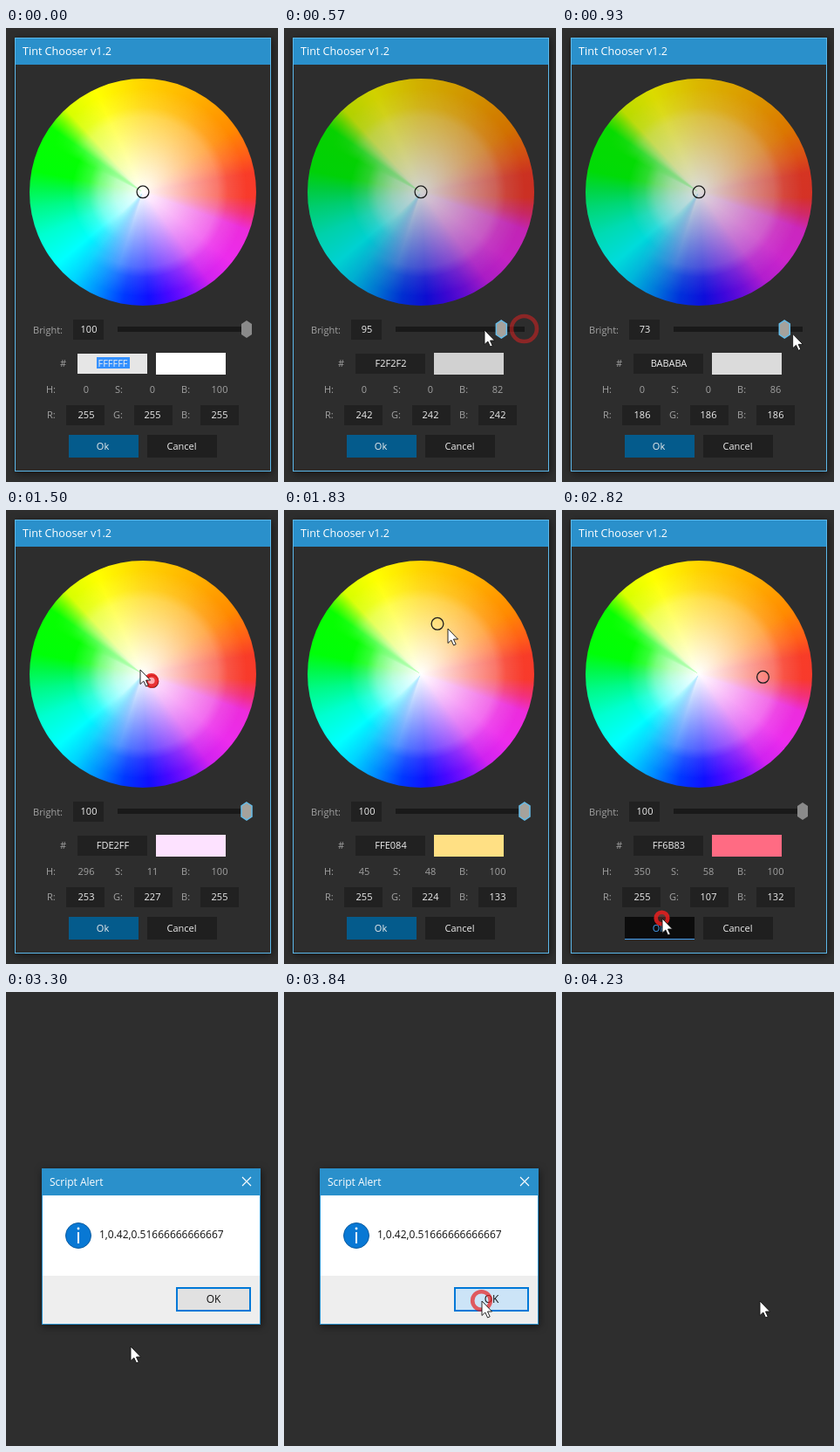
An HTML page for the animation above (4.26 s loop, 312 by 520 pixels).

```html
<!DOCTYPE html>
<html lang="en">
<head>
<meta charset="utf-8">
<title>Colour dialog</title>
<style>
  html, body { margin: 0; width: 100%; height: 100%; overflow: hidden; background: #2e2e2e; }
  #dialog, svg { position: absolute; left: 0; top: 0; width: 312px; height: 520px; }
  #dialog { transform-origin: 157px 259px; }
  #wheel { position: absolute; left: 27px; top: 58px; width: 260px; height: 260px; border-radius: 50%; overflow: hidden; }
  #wheel > div { position: absolute; inset: 0; }
  /* The green and cyan sector loses its white sooner than the rest. */
  #warm {
    background: radial-gradient(closest-side, #fff, rgba(255,255,255,.52) 45%, rgba(255,255,255,.31) 66%, rgba(255,255,255,.13) 75%, rgba(255,255,255,0) 92%);
    -webkit-mask-image: conic-gradient(#000 198deg, transparent 226deg 296deg, #000 311deg);
    mask-image: conic-gradient(#000 198deg, transparent 226deg 296deg, #000 311deg);
  }
  #cool {
    background: radial-gradient(closest-side, #fff, rgba(255,255,255,.72) 25%, rgba(255,255,255,.46) 39%, rgba(255,255,255,.2) 48%, rgba(255,255,255,0) 63%);
    -webkit-mask-image: conic-gradient(transparent 198deg, #000 226deg 296deg, transparent 311deg);
    mask-image: conic-gradient(transparent 198deg, #000 226deg 296deg, transparent 311deg);
  }
  #shade { background: #000; }
  text { font: 11px "Open Sans", "Noto Sans", sans-serif; fill: #eee; }
  .label { fill: #a2a2a2; }
  .mid { text-anchor: middle; }
  .title { font-size: 12.6px; fill: #fff; }
  .field { fill: #212121; }
  .shadow { filter: drop-shadow(1px 2px 4px rgba(0, 0, 0, .55)); }
  #alert { transform-origin: 166px 291px; }
  #alert text { font-size: 12px; }
</style>
</head>
<body>
<div id="dialog">
  <svg viewBox="0 0 312 520">
    <rect class="shadow" x="10.5" y="11.5" width="293" height="496" fill="#2d2d2d" stroke="#5cb8ea"/>
    <rect x="11" y="12" width="292" height="30" fill="#2a90cb"/>
    <text class="title" x="19" y="31">Tint Chooser v1.2</text>

    <text class="label" x="31" y="350">Bright:</text>
    <rect class="field" x="77" y="334" width="35" height="23"/>
    <text class="mid" id="bright" x="95" y="349"></text>
    <rect x="128" y="342" width="148" height="6" fill="#191919"/>
    <path id="knob" d="M0-10 6-6V6L0 10-6 6V-6Z"/>

    <text class="label" x="62" y="388">#</text>
    <rect id="hexField" x="82" y="373" width="80" height="23"/>
    <rect id="selection" x="104" y="377" width="38" height="13" fill="#3390ff"/>
    <text class="mid" id="hex" x="122.5" y="388"></text>
    <rect id="swatch" x="172" y="372" width="80" height="25"/>

    <g id="hsb"></g>
    <g id="rgb"></g>

    <rect id="okBox" x="72" y="466" width="80" height="26"/>
    <rect id="okLine" x="72" y="491" width="80" height="1" fill="#46a0f0"/>
    <text class="mid" id="okText" x="111" y="483">Ok</text>
    <rect x="162" y="466" width="80" height="26" fill="#1f1f1f"/>
    <text class="mid" x="201.5" y="483">Cancel</text>
  </svg>
  <div id="wheel"><div id="warm"></div><div id="cool"></div><div id="shade"></div></div>
  <svg viewBox="0 0 312 520">
    <circle id="marker" r="6.9" fill="none" stroke="#1c1c1c" stroke-width="1.3"/>
  </svg>
</div>
<svg viewBox="0 0 312 520">
  <g id="alert">
    <rect class="shadow" x="41.5" y="202.5" width="250" height="178" fill="#fff" stroke="#2a90cb"/>
    <rect x="42" y="203" width="249" height="30" fill="#2a90cb"/>
    <text x="50" y="222" style="fill:#fff">Script Alert</text>
    <path d="M271 212l10 10m0-10l-10 10" stroke="#fff" stroke-width="1.1"/>
    <rect x="42" y="325" width="249" height="55" fill="#eee"/>
    <circle cx="83" cy="279" r="14.5" fill="#0878d4" stroke="#0a5ba0"/>
    <path d="M83 275v13" stroke="#fff" stroke-width="2"/>
    <circle cx="83" cy="271" r="1.4" fill="#fff"/>
    <text x="107" y="282" style="fill:#111">1,0.42,0.51666666666667</text>
    <rect id="alertOk" x="196" y="339" width="84" height="26" stroke="#0078d7" stroke-width="2"/>
    <text class="mid" x="238" y="356" style="fill:#111">OK</text>
  </g>
  <circle id="ring" stroke="#e82020" stroke-width="4.6" fill="#ff7068"/>
  <path id="cursor" d="M0 0V16.5L3.8 13 6.6 19 9.2 17.8 6.5 12H11.6Z" fill="#fff" stroke="#111" stroke-width=".9"/>
</svg>
<script>
const LOOP = 4260, STEP = 30;
const CENTER = { x: 156.5, y: 187.5 };
const $ = id => document.getElementById(id);
const set = (id, attrs) => { for (const k in attrs) $(id).setAttribute(k, attrs[k]); };
const clamp = (v, lo, hi) => Math.min(hi, Math.max(lo, v));

// Clockwise angle from the top, hue, rim colour
const RIM = [
  [0, 50, '#ffd400'], [30, 41, '#ffb000'], [55, 31, '#ff8a00'], [70, 18, '#ff5f18'],
  [80, 6, '#f83c28'], [92.73, -10, '#f83a2c'], [102, -25, '#f2307c'], [110, -40, '#ec2cdc'],
  [128.2, -64, '#ec2cec'], [143, -75, '#d022f0'], [155, -90, '#8010fa'], [166, -105, '#4808ff'],
  [177, -120, '#1010ff'], [190, -133, '#0038ff'], [205, -155, '#0090ff'], [218, -170, '#00d4ff'],
  [230, -180, '#00ffff'], [247, -195, '#00ffd0'], [262, -212, '#00fa88'], [272, -228, '#00f848'],
  [281, -240, '#00ff08'], [305, -245, '#08ff00'], [311, -265, '#68ff00'], [317, -287, '#d8ff00'],
  [335, -300, '#ffff00'], [360, -310, '#ffd400']
];

// Pointer path: time, x, y
const PATH = [
  [0, 330, 535], [60, 322, 520], [210, 295, 405], [330, 277, 350], [390, 276, 345], [480, 276, 345],
  [510, 268.6, 345], [540, 249, 346], [570, 230, 346], [660, 186, 348], [720, 172, 349], [780, 180, 349],
  [900, 255, 350], [990, 284, 351], [1170, 284, 351], [1290, 225, 268], [1410, 170, 199],
  [1470, 167.3, 196], [1500, 154, 183], [1590, 127, 152], [1680, 132, 133], [1770, 163, 124],
  [1890, 213, 148], [1980, 230, 191], [2070, 230, 191], [2220, 208, 232], [2430, 158, 360],
  [2610, 121, 457], [2730, 115, 468], [3030, 115, 468], [3180, 134, 430], [3300, 143, 406],
  [3420, 174, 388], [3600, 224, 357], [3690, 227, 354], [4260, 227, 354]
];
const SLIDE = [480, 990], PICK = [1470, 1980];
const CLICKS = [420, 1470, 2780, 3750];

function track(list, at) {
  const i = clamp(list.findIndex(p => p[0] > at), 1, list.length - 1);
  const a = list[i - 1], b = list[i], k = clamp((at - a[0]) / (b[0] - a[0]), 0, 1);
  return [1, 2].map(n => a[n] + (b[n] - a[n]) * k);
}

function brightness(t) {
  const x = track(PATH, clamp(t, ...SLIDE))[0];
  return Math.round(clamp((x - 128) / 148, 0, 1) * 100);
}

function pick(t) {
  if (t < PICK[0]) return { ...CENTER, h: 0, s: 0 };
  const [x, y] = track(PATH, clamp(t - STEP, ...PICK));
  const dx = x - CENTER.x, dy = y - CENTER.y;
  const angle = (Math.atan2(dx, -dy) * 180 / Math.PI + 360) % 360;
  const h = (Math.round(track(RIM, angle)[0]) + 360) % 360;
  return { x, y, h, s: Math.round(clamp(Math.hypot(dx, dy) / 126, 0, 1) * 100) };
}

function toRgb(h, s, v) {
  return [5, 3, 1].map(n => {
    const k = (n + h / 60) % 6;
    return 255 * v / 100 * (1 - s / 100 * clamp(Math.min(k, 4 - k), 0, 1));
  });
}

const toHex = rgb => rgb.map(c => Math.floor(c + 1e-6).toString(16).padStart(2, '0')).join('').toUpperCase();

function buildRows() {
  const labelX = { H: 46, S: 125, R: 47, G: 123, B: 201 };
  const row = (names, y, boxed) => [...names].map((name, i) =>
    `<text class="label" x="${labelX[name]}" y="${y}">${name}:</text>` +
    (boxed ? `<rect class="field" x="${[69, 147, 223][i]}" y="${y - 15}" width="44" height="23"/>` : '') +
    `<text class="mid value ${boxed ? '' : 'label'}" x="${[92, 168, 245][i]}" y="${y}"></text>`).join('');
  $('hsb').innerHTML = row('HSB', 418, false);
  $('rgb').innerHTML = row('RGB', 447, true);
}

function fillRow(id, values) {
  $(id).querySelectorAll('.value').forEach((el, i) => { el.textContent = Math.round(values[i]); });
}

function fade(id, amount) {
  const style = $(id).style;
  style.opacity = amount;
  style.transform = `scale(${.94 + .06 * amount})`;
  style.display = amount > 0 ? '' : 'none';
}

function drawRing(t) {
  const start = CLICKS.filter(c => c <= t).pop();
  const age = start === undefined ? 999 : t - start;
  const [x, y] = track(PATH, start || 0);
  set('ring', {
    cx: x - .5, cy: y - .5, r: 4 + age * .07,
    'fill-opacity': clamp(1.5 - age / 32, 0, .9), opacity: clamp(1 - age / 300, 0, 1)
  });
}

function render(t) {
  const [cx, cy] = track(PATH, t);
  const p = pick(t), v = brightness(t - STEP), lateV = brightness(t - 2 * STEP);
  const rgb = toRgb(p.h, p.s, lateV);
  const focused = t < 420, hover = t >= 330 && t < 2610, pressed = t >= 2760;

  fade('dialog', 1 - clamp((t - 2940) / 120, 0, 1));
  fade('alert', clamp((t - 3060) / 120, 0, 1) - clamp((t - 3900) / 150, 0, 1));

  $('shade').style.opacity = 1 - v / 100;
  set('marker', { cx: p.x + .5, cy: p.y + .3 });
  set('knob', {
    transform: `translate(${128 + 1.48 * v} 345)`,
    fill: hover ? '#a5a29c' : '#8a8a8a', stroke: hover ? '#66bce8' : 'none', 'stroke-width': 1.5
  });
  $('bright').textContent = lateV;
  $('hex').textContent = toHex(rgb);
  set('hexField', { fill: focused ? '#e6e6e6' : '#212121' });
  set('selection', { opacity: focused ? 1 : 0 });
  set('swatch', { fill: '#' + toHex(toRgb(p.h, p.s, v)) });
  fillRow('hsb', [p.h, p.s, v]);
  fillRow('rgb', rgb);

  set('okBox', { fill: pressed ? '#0c0c0c' : '#045b8c' });
  set('okLine', { opacity: pressed ? 1 : 0 });
  $('okText').style.fill = pressed ? '#46a0f0' : '';
  set('alertOk', { fill: t >= 3750 ? '#cce4f7' : t >= 3510 ? '#e5f1fb' : '#e1e1e1' });

  set('cursor', { transform: `translate(${cx} ${cy})` });
  drawRing(t);
}

buildRows();
$('wheel').style.background = `conic-gradient(${RIM.map(([deg, , color]) => `${color} ${deg}deg`).join()})`;

const begin = performance.now();
function tick() {
  const t = (performance.now() - begin) % LOOP;
  render(Math.floor(t / STEP) * STEP);
  requestAnimationFrame(tick);
}
tick();
</script>
</body>
</html>
```
